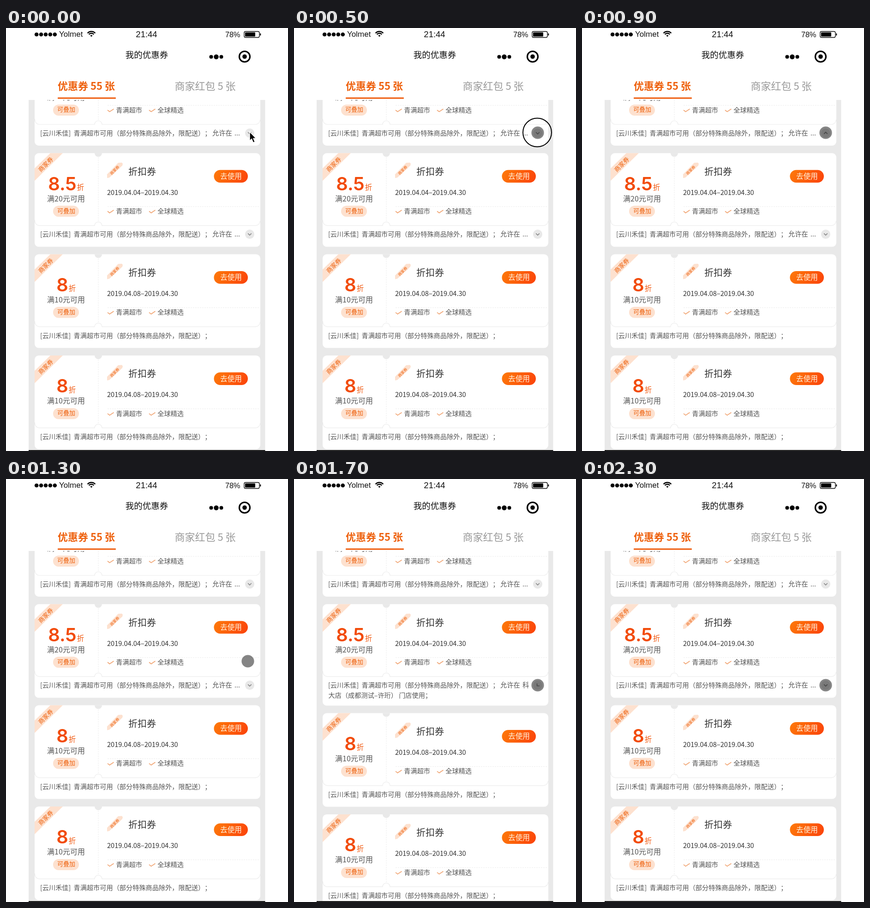
An HTML page with a canvas for the animation above (2400 ms loop, 611 px wide and 917 px high).

```html
<!DOCTYPE html>
<html lang="zh-CN">
<head>
<meta charset="utf-8">
<title>我的优惠券</title>
<style>
html, body { margin: 0; width: 611px; height: 917px; overflow: hidden; background: #fff; }
canvas { display: block; }
</style>
</head>
<body>
<canvas id="stage" width="611" height="917"></canvas>
<script>
const g = document.getElementById('stage').getContext('2d');
const CJK = '"Noto Sans CJK SC", "Noto Sans CJK", "Noto Sans CJK JP", sans-serif';
const LATIN = '"Liberation Sans", Arial, sans-serif';
const DIGITS = 'Inter, "Liberation Sans", sans-serif';
const ORANGE = '#ee600c', PEACH = '#fde1cf', GREY = '#e9e9e9', INK = '#555', FAINT = '#ececec';
const LOOP = 2400, STEP = 100, EXTRA = 17;

const cards = [
  { rate: '8.5', min: '满20元可用', date: '2019.04.04–2019.04.30', fold: true },
  { rate: '8.5', min: '满20元可用', date: '2019.04.04–2019.04.30', fold: true },
  { rate: '8', min: '满10元可用', date: '2019.04.08–2019.04.30' },
  { rate: '8', min: '满10元可用', date: '2019.04.08–2019.04.30' }
];

// When each foldable card is open, and how its arrow turns (time, degrees)
const folds = [
  { from: 600, to: 900, turn: [[550, 0], [750, 180], [900, 180], [1100, 0]] },
  { from: 1700, to: 2100, turn: [[1650, 0], [1850, 180], [2100, 180], [2300, 0]] }
];
const presses = [500, 800, 1600, 2000];
const touchX = [[1100, 528], [1300, 524], [1500, 528]];
const touchY = [[400, 226], [500, 227], [1100, 227], [1300, 395], [1500, 447]];

function track(keys, t) {
  if (t <= keys[0][0]) return keys[0][1];
  for (let i = 1; i < keys.length; i++) {
    const [a, u] = keys[i - 1], [b, v] = keys[i];
    if (t <= b) return u + (v - u) * (t - a) / (b - a);
  }
  return keys[keys.length - 1][1];
}

// y is the vertical middle of the line
function text(str, x, y, size, color, { align = 'left', weight = 400, font = CJK } = {}) {
  g.font = `${weight} ${size}px ${font}`;
  g.textAlign = align;
  g.fillStyle = color;
  g.fillText(str, x, y + size * 0.37);
}

function box(x, y, w, h, r, fill) {
  g.beginPath();
  g.roundRect(x, y, w, h, r);
  g.fillStyle = fill;
  g.fill();
}

function disc(x, y, r, fill) {
  g.beginPath();
  g.arc(x, y, r, 0, 7);
  g.fillStyle = fill;
  g.fill();
}

function ring(x, y, r, width) {
  g.beginPath();
  g.arc(x, y, r, 0, 7);
  stroke('#000', width);
}

function stroke(color, width) {
  g.strokeStyle = color;
  g.lineWidth = width;
  g.stroke();
}

function path(points) {
  g.beginPath();
  points.forEach(([x, y]) => g.lineTo(x, y));
}

function shape(points, fill) {
  path(points);
  g.closePath();
  g.fillStyle = fill;
  g.fill();
}

function slanted(str, x, y, size) {
  g.save();
  g.translate(x, y);
  g.rotate(-Math.PI / 4);
  text(str, 0, 0, size, ORANGE, { align: 'center' });
  g.restore();
}

function dashed(x1, y1, x2, y2) {
  g.setLineDash([3, 2]);
  path([[x1, y1], [x2, y2]]);
  stroke(FAINT, 1);
  g.setLineDash([]);
}

function header() {
  for (let i = 0; i < 5; i++) disc(66.2 + i * 9.9, 14, 4.3, '#000');
  text('Yolmet', 115, 13, 17, '#111', { font: LATIN });
  g.lineCap = 'butt';
  [3.5, 7.5, 11.5].forEach((r, i) => {
    g.beginPath();
    g.arc(185, 19, r, -Math.PI * 0.76, -Math.PI * 0.24);
    if (i) stroke('#000', 2.3);
    else {
      g.lineTo(185, 19);
      g.fillStyle = '#000';
      g.fill();
    }
  });
  text('21:44', 304.5, 13, 18.5, '#111', { align: 'center', font: LATIN });
  text('78%', 475, 13.5, 16.3, '#111', { font: LATIN });
  g.beginPath();
  g.roundRect(516, 7.5, 33, 13, 3);
  stroke('#000', 1.3);
  box(518, 9.5, 22, 9, 1, '#000');
  box(550.3, 11.5, 2, 5, 1, '#000');

  text('我的优惠券', 305, 58, 18.5, '#111', { align: 'center' });
  disc(444.5, 62.5, 4, '#000');
  disc(455.5, 62.5, 5.2, '#000');
  disc(466.5, 62.5, 4, '#000');
  ring(517, 62, 11.5, 3.2);
  disc(517, 62, 4.8, '#000');

  text('优惠券 55 张', 174, 126, 22, ORANGE, { align: 'center', weight: 700 });
  text('商家红包 5 张', 431.5, 126, 22, '#999', { align: 'center' });
  box(112, 150.5, 126, 3, 1, '#ee5a0a');
}

function ribbons(top) {
  shape([[96, top], [123, top], [62, top + 60], [62, top + 33]], PEACH);
  slanted('商家券', 86, top + 24.5, 13);
  shape([[219, top + 46], [243, top + 21], [251, top + 20.5], [253, top + 23],
    [252, top + 27], [224, top + 53], [219, top + 54]], PEACH);
  slanted('商家券', 235.5, top + 37, 8.2);
}

function price(card, top) {
  g.font = `600 40px ${DIGITS}`;
  const w = g.measureText(card.rate).width, x = 130 - (w + 16) / 2;
  text(card.rate, x, top + 65.5, 40, '#f24b0a', { weight: 600, font: DIGITS });
  text('折', x + w + 1, top + 74, 15.5, '#f0560c');
  text(card.min, 130, top + 98.5, 16, INK, { align: 'center' });
  box(102, top + 114, 56, 24, 12, PEACH);
  text('可叠加', 130.5, top + 124.5, 13, ORANGE, { align: 'center', weight: 500 });
}

function button(top) {
  const fill = g.createLinearGradient(455, top + 30, 520, top + 70);
  fill.addColorStop(0, '#fd7a0a');
  fill.addColorStop(1, '#fb420a');
  box(450.5, top + 36.5, 73.5, 27.5, 13.7, fill);
  text('去使用', 487.5, top + 50, 15.7, '#fff4e0', { align: 'center' });
}

function perk(str, x, top) {
  path([[x, top + 126], [x + 4.5, top + 129.5], [x + 13.5, top + 123.5]]);
  stroke('#f1a878', 1.8);
  text(str, x + 18.3, top + 125.5, 14.2, INK);
}

function outline(top) {
  const base = top + 157;
  g.beginPath();
  g.moveTo(62.5, base - 12);
  g.arcTo(62.5, base, 74, base, 10);
  g.lineTo(191, base);
  g.arc(200, base, 8, Math.PI, 0);
  g.lineTo(538, base);
  g.arcTo(550.5, base, 550.5, base - 12, 10);
  stroke(FAINT, 1.2);
  dashed(200, top + 9, 200, base - 9);
  dashed(220, top + 115.7, 550, top + 115.7);
  g.beginPath();
  g.arc(200, top, 8, 0, Math.PI);
  g.fillStyle = GREY;
  g.fill();
}

function arrow(x, y, degrees) {
  disc(x, y, 10, '#e8e8e8');
  g.save();
  g.translate(x, y);
  g.rotate(degrees * Math.PI / 180);
  path([[-3.8, -1.8], [0, 2], [3.8, -1.8]]);
  stroke('#888', 1.7);
  g.restore();
}

function coupon(card, top, open, degrees) {
  box(62, top, 489, 203 + (open ? EXTRA : 0), 9, '#fff');
  outline(top);
  ribbons(top);
  price(card, top);
  text('折扣券', 265, top + 40, 20, '#333');
  text(card.date, 219, top + 85, 14.6, '#333');
  button(top);
  perk('青满超市', 220, top);
  perk('全球精选', 310, top);

  const y = top + 175.8;
  text('[云川禾佳]', 74, y, 14.2, INK);
  text('青满超市可用（部分特殊商品除外，限配送）；', 146.5, y, 14.2, INK);
  if (!card.fold) return;
  text('允许在', 447, y, 14.3, INK);
  text(open ? '科' : '...', 495, y, 14.3, INK);
  if (open) text('大店（成都测试–许珩） 门店使用；', 74.5, y + 21.5, 14.2, INK);
  arrow(528, y, degrees);
}

function pointer(t) {
  const x = track(touchX, t), y = track(touchY, t);
  if (t < 100) {
    path([[528, 225], [528, 244.5], [532.3, 240.5], [535.6, 248.5], [539.3, 247],
      [536, 239.3], [541.5, 239]]);
    g.closePath();
    g.fillStyle = '#000';
    g.fill();
    stroke('#fff', 1.4);
    return;
  }
  disc(x, y, 13.6, 'rgba(0,0,0,.48)');
  if (presses.includes(t)) ring(x - 1, y - 0.5, 31, 2);
}

function draw(t) {
  g.fillStyle = '#fff';
  g.fillRect(0, 0, 611, 917);
  g.save();
  g.beginPath();
  g.rect(49, 156, 512.5, 761);
  g.clip();
  g.fillStyle = GREY;
  g.fillRect(49, 156, 513, 761);
  let shift = 0;
  cards.forEach((card, i) => {
    const fold = folds[i];
    const open = !!fold && t >= fold.from && t < fold.to;
    coupon(card, 52 + i * 219.3 + shift, open, fold ? track(fold.turn, t) : 0);
    if (open) shift += EXTRA;
  });
  g.fillStyle = '#111';
  g.fillRect(49, 915, 513, 2);
  g.restore();
  header();
  pointer(t);
}

function tick() {
  draw(Math.floor(performance.now() % LOOP / STEP) * STEP);
  requestAnimationFrame(tick);
}
tick();
</script>
</body>
</html>
```
